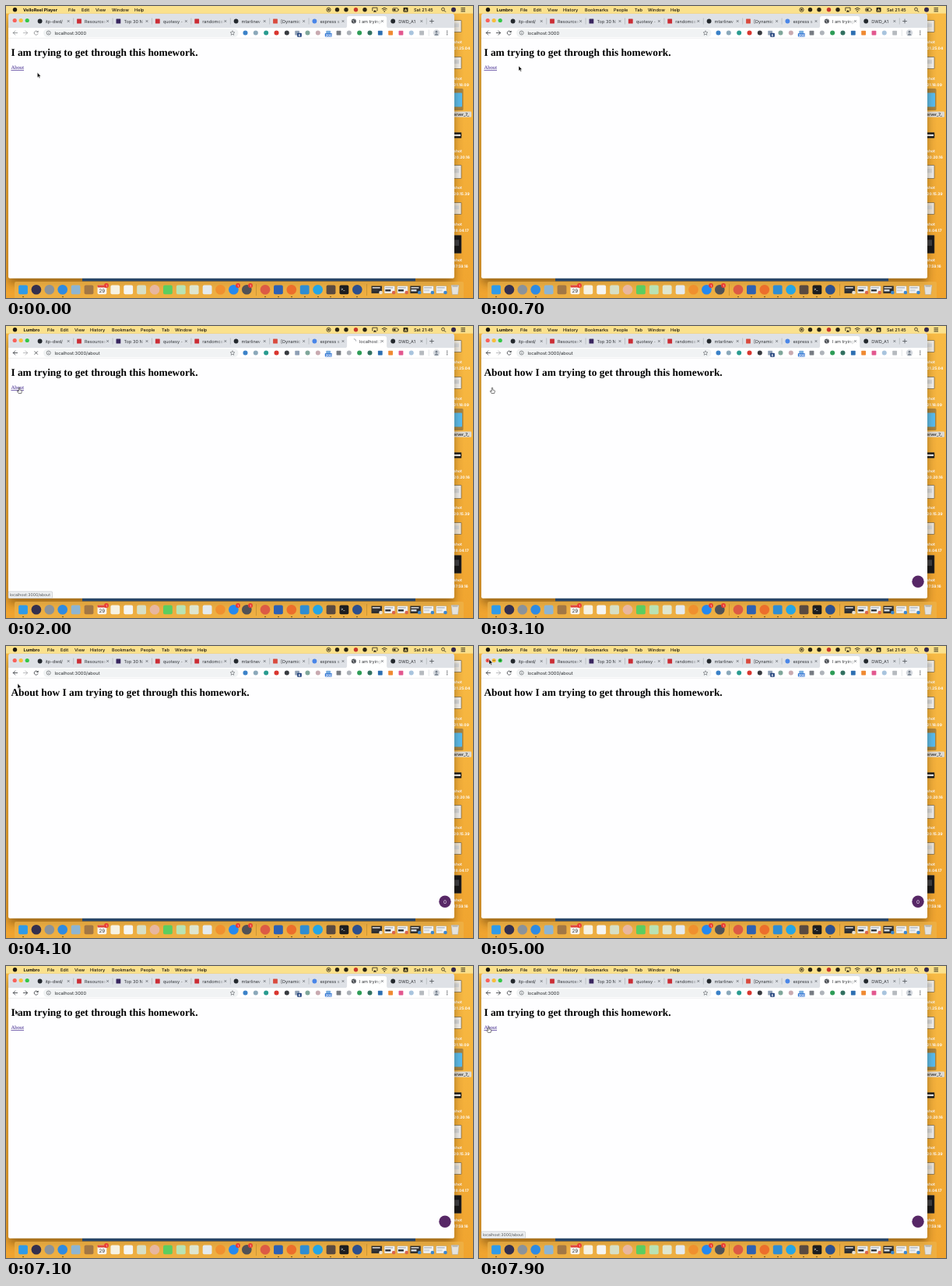
These frames come from a looping animation (600 by 375 pixels, 8000 ms). An HTML page:

```html
<!DOCTYPE html>
<html lang="en">
<head>
<meta charset="utf-8">
<title>Homework walkthrough</title>
<style>
  html, body { margin: 0; width: 100%; height: 100%; overflow: hidden; background: #f3ac37; }
  #stage { display: block; width: 600px; height: 375px; }
  text { font-family: Inter, "Open Sans", sans-serif; text-rendering: geometricPrecision; white-space: pre; }
  .page text { font-family: "Liberation Serif", "Times New Roman", serif; }
</style>
</head>
<body>
<svg id="stage" viewBox="0 0 600 375" xmlns="http://www.w3.org/2000/svg"></svg>
<script>
const LOOP = 8000, STEP = 100;

// --- drawing helpers ---
const rect = (x, y, w, h, fill, r = 0, extra = '') =>
  `<rect x="${x}" y="${y}" width="${w}" height="${h}" rx="${r}" fill="${fill}" ${extra}/>`;
const disc = (x, y, r, fill, extra = '') =>
  `<circle cx="${x}" cy="${y}" r="${r}" fill="${fill}" ${extra}/>`;
const line = (d, stroke = '#5f6368', w = .8, extra = '') =>
  `<path d="${d}" fill="none" stroke="${stroke}" stroke-width="${w}" ${extra}/>`;
const text = (x, y, size, str, fill = '#202124', extra = '') =>
  `<text x="${x}" y="${y}" font-size="${size}" fill="${fill}" ${extra}>${str}</text>`;
const group = (id, body, extra = '') => `<g id="${id}" ${extra}>${body}</g>`;
const cross = (x, y, r, c, w) =>
  line(`M${x - r} ${y - r}L${x + r} ${y + r}M${x + r} ${y - r}L${x - r} ${y + r}`, c, w);
const BOLD = 'font-weight="700"';

const defs = `<defs>
  <linearGradient id="wall" x2="0" y2="1"><stop stop-color="#f8bb45"/><stop offset="1" stop-color="#f0a42f"/></linearGradient>
  <linearGradient id="fade"><stop stop-color="#dee1e6" stop-opacity="0"/><stop offset="1" stop-color="#dee1e6"/></linearGradient>
  <linearGradient id="fadeOn"><stop stop-color="#fff" stop-opacity="0"/><stop offset="1" stop-color="#fff"/></linearGradient>
  <filter id="soft" x="-10%" y="-10%" width="120%" height="120%"><feGaussianBlur stdDeviation="6"/></filter>
</defs>`;

// --- desktop files on the right ---
function desktop() {
  const shots = [
    [26, 15, '#f3efe6', '21.25.04'], [73, 15, '#f6f5f2', '21.18.09'], [166, 7, '#111', '20.20.16'],
    [213, 17, '#f1f1f0', '20.15.39'], [260, 15, '#f0e9dc', '18.04.17'], [306, 23, '#15161a', '17.59.16'],
  ];
  let out = '';
  for (const [y, h, fill, time] of shots) {
    out += rect(570, y - h / 2, 15, h, fill, .4, 'stroke="#55503f" stroke-width=".6"');
    if (fill !== '#111') out += rect(570, y - h / 4, 12, h / 3, fill === '#15161a' ? '#3a3d44' : '#d9dde2');
    else out += rect(570, y - 1.2, 14, 2.4, '#f4f4f4');
    out += text(575.3, y + 22.3, 4.9, 'shot', '#fff', BOLD) + text(575.3, y + 29.6, 4.9, time, '#fff', BOLD);
  }
  out += rect(566, 106, 21.5, 28, '#a9843f', 1.5) + rect(566, 111.5, 20, 18, '#58bdf0', 1);
  return out + rect(566, 135.5, 32, 7.3, '#dcd9d2', 1) + text(575.3, 140.9, 4.9, 'erver_7_', '#333', BOLD);
}

// --- menu bar ---
function menu(id, items) {
  return group(id, items.map(([x, s], i) => text(x, 7, 5.6, s, '#171309', i ? 'font-weight="500"' : BOLD)).join(''));
}
function menuBar() {
  const ink = '#2b2413';
  let out = rect(0, 0, 600, 9.6, '#fae18d') + disc(11.5, 4.8, 2.7, '#1c1810');
  out += menu('menuA', [[22, 'VelloReel Player'], [80, 'File'], [97, 'Edit'], [115, 'View'], [136, 'Window'], [165, 'Help']]);
  out += menu('menuB', [[22.5, 'Lumbro'], [53, 'File'], [70, 'Edit'], [88, 'View'], [108, 'History'],
    [136, 'Bookmarks'], [173, 'People'], [200, 'Tab'], [217, 'Window'], [246, 'Help']]);
  out += disc(414.5, 4.8, 2.6, 'none', `stroke="${ink}" stroke-width=".8"`) + disc(414.5, 4.8, 1.2, ink);
  out += disc(425.5, 4.8, 2.7, ink) + disc(437, 4.8, 2.7, ink);
  out += disc(449.5, 4.8, 2.7, '#c5372c') + disc(461, 4.8, 2.7, ink);
  out += line('M471.500 6H470.800V2.200H477V6H476.200', ink, .8) + `<path d="M471.800 7.800L473.900 5L476 7.800Z" fill="${ink}"/>`;
  out += line('M482.800 3.800q3.400-3 6.800 0M484 5.400q2.200-2 4.400 0', ink, .9) + disc(486.2, 7, .8, ink);
  out += rect(496.6, 2.8, 7, 4, 'none', 1, `stroke="${ink}" stroke-width=".7"`) + rect(497.5, 3.7, 3, 2.2, ink) + rect(504.2, 4, .7, 1.6, ink);
  out += rect(510.5, 2, 6, 5.8, ink, 1) + text(511.8, 6.7, 4.8, 'A', '#fae18d', BOLD);
  out += text(524, 7, 5.6, 'Sat 21:45', '#171309', 'font-weight="500"');
  out += disc(561.5, 4.2, 1.9, 'none', `stroke="${ink}" stroke-width=".8"`) + line('M563 5.700l2 2', ink, .9);
  out += disc(575, 4.8, 3, '#33284d');
  return out + line('M584.500 2.700h5.500M584.500 4.800h5.500M584.500 6.900h5.500', ink, .9);
}

// --- browser window ---
function tabStrip() {
  const tabs = [
    ['c', '#24292e', 'itp-dwd/'], ['s', '#cb2d35', 'Resources'], ['s', '#39265f', 'Top 30 N'], ['s', '#cb2d35', 'quotesy -'],
    ['s', '#cb2d35', 'randomco'], ['c', '#24292e', 'mtarlinev'], ['s', '#d94a3d', '[Dynamic'], ['c', '#4a86e8', 'express s'],
    ['', '', ''], ['c', '#24292e', 'DWD_A1'],
  ];
  const light = (x, c) => disc(x, 18.5, 2.6, c);
  let out = `<path d="M3 28V13q0-3.400 3.400-3.400H572.600q3.400 0 3.400 3.400V28Z" fill="#dee1e6"/>`;
  out += light(11.2, '#f9605a') + light(19.2, '#f8be3c') + light(27.2, '#34c748');
  out += group('hover', cross(11.2, 18.5, 1.1, '#7a1410', .6) + line('M17.600 18.500h3.200', '#8a5a0a', .7) +
    line('M25.800 18.500h2.800M27.200 17.100v2.800', '#0f6318', .7));
  out += `<path d="M435.500 28q2.600 0 2.600-2.600V15.500q0-2.600 2.600-2.600H486.500q2.600 0 2.600 2.600v9.900q0 2.600 2.600 2.600Z" fill="#fff"/>`;
  tabs.forEach(([shape, color, name], i) => {
    const x = 43.6 + i * 50.4, on = i === 8;
    if (shape === 'c') out += disc(x, 19.5, 2.9, color);
    if (shape === 's') out += rect(x - 2.9, 16.6, 5.8, 5.8, color, .5);
    const label = on ? text(0, 7, 5.6, 'I am trying', '#303337', 'id="tabName"') : text(0, 7, 5.6, name, '#303337');
    out += `<svg x="${x + 7}" y="14.8" width="28" height="10">${label}${rect(21, 0, 7, 10, on ? 'url(#fadeOn)' : 'url(#fade)')}</svg>`;
    out += cross(x + 36.6, 19.5, 1.3, '#4d5156', .7);
    if (i < 7 || i > 8) out += line(`M${x + 43.1} 15.500v8`, '#9a9ea4', .5);
  });
  out += group('globe', disc(446.8, 19.5, 3, '#4a4e53') + line('M444.600 18.200l2 .6-.4 1.600 1.800 1.200M447.300 17l1.300 1.300', '#c9ccd0', .7));
  out += group('spinner', line('M0-2.900A2.900 2.900 0 0 1 2.900 0', '#8a8f96', .8));
  return out + line('M547 16.700v5.600M544.200 19.500h5.600', '#4d5156', .8);
}

function extensions() {
  const icons = [
    ['c', '#3b82c8'], ['c', '#8ca9ba'], ['c', '#2a9c90'], ['c', '#d9362f'], ['c', '#383b40'], ['s', '#8e9fb5'],
    ['c', '#7fa69a'], ['c', '#c8aab0'], ['s', '#78aee0'], ['s', '#777c82'], ['c', '#aeb3b9'], ['c', '#2e9d57'],
    ['c', '#327160'], ['s', '#2d6fb2'], ['s', '#ef8a32'], ['s', '#e2588f'], ['c', '#a8c4de'], ['s', '#b6babf'],
  ];
  let out = icons.map(([shape, c], i) => {
    const x = 307.5 + i * 13.33;
    return shape === 'c' ? disc(x, 34.6, 3, c) : rect(x - 2.9, 31.7, 5.8, 5.8, c, .7);
  }).join('');
  out += group('tally', rect(374.2, 34.7, 5.6, 5, '#1f3f7a', .8) + text(375.6, 38.7, 4.3, '6', '#fff', BOLD));
  return out + rect(409.8, 35, 9, 4.6, '#3a7bd5', .8) + text(410.7, 38.7, 4, '200', '#fff', BOLD);
}

function toolbar() {
  const round = 'stroke-linecap="round" stroke-linejoin="round"';
  let out = rect(3, 28, 573, 13.2, '#fff') + line('M3 41.300H576', '#dcdee1', .5);
  out += disc(12, 34.5, 5.4, '#e6e8eb', 'id="backHover"');
  out += line('M14.600 34.500H9.400M11.800 31.900L9.200 34.500L11.800 37.100', '#3f4347', .85, `id="back" ${round}`);
  out += line('M22.300 34.500h5.200M25 31.900l2.600 2.600L25 37.100', '#3f4347', .85, `id="next" ${round}`);
  out += group('reload', line('M40.800 33.200A2.500 2.500 0 1 0 41.100 35.300', '#3f4347', .85) +
    '<path d="M41.600 31.400v2.700h-2.700Z" fill="#3f4347"/>');
  out += group('stop', cross(38.7, 34.5, 2.1, '#3f4347', .85));
  out += rect(48, 29.2, 250.5, 10.8, '#f1f3f4', 5.4);
  out += disc(54.7, 34.5, 2.5, 'none', 'stroke="#5f6368" stroke-width=".7"') + line('M54.700 34.200v1.700M54.700 32.700v.7', '#5f6368', .7);
  out += text(62.4, 36.6, 5.75, '', '#26292c', 'id="url"');
  out += line('M291 31.700l.8 1.900 2.100.2-1.600 1.400.5 2.100-1.800-1.100-1.800 1.100.5-2.100-1.600-1.400 2.100-.2Z', '#5f6368', .6);
  out += extensions() + line('M543.300 30.500v8', '#cfd2d6', .6);
  out += disc(553, 34.5, 4.2, '#d5d9df') + disc(553, 33.2, 1.4, '#75808d') + `<path d="M550.300 37.400q2.700-4.200 5.400 0Z" fill="#75808d"/>`;
  return out + [32.3, 34.5, 36.7].map(y => disc(566.8, y, .7, '#4d5156')).join('');
}

function browser() {
  let out = rect(98, 345, 428, 8.4, '#1d5ca8');
  out += rect(3, 16, 573, 341, '#3a2200', 3, 'opacity=".45" filter="url(#soft)"');
  out += rect(3, 30, 573, 319.7, '#fefeff', 2) + tabStrip() + toolbar();
  const title = text(6.4, 63.5, 13.36, '', '#000', `id="title" ${BOLD}`);
  const link = text(6.4, 81.4, 6.67, 'About', '#351a86', 'id="link" text-decoration="underline"');
  out += group('', title + link, 'class="page"');
  out += group('badge', disc(564, 328.3, 7.7, '#572766') + text(564, 330.7, 6.4, '0', '#e9dcee', 'id="count" text-anchor="middle"'));
  return out + group('status', rect(3, 341, 56.5, 8.6, '#eef0f2', 1, 'stroke="#aeb2b8" stroke-width=".5"') +
    text(4.8, 347.1, 5.15, 'localhost:3000/about', '#4d5156'));
}

// --- dock ---
function dock() {
  const left = 's#2f9be9 c#34304f c#8b939b c#2e8be2 s#8db5d4 s#a27745 s#f7f6f3 s#f6f2e2 s#f5f5f3 s#d7dfc5 c#e8b79f s#5ccd60 s#b9e3b4 s#dfe6cf s#e3eaef c#f0902f c#2589ef c#505257';
  const right = 'c#dc5a45 s#2d61b3 c#ec6e2c s#2e8dd3 c#25a5e5 s#5a4a40 s#1c1d1f c#2c4f8d';
  const icon = (spec, x) => {
    const c = spec.slice(1);
    return spec[0] === 'c' ? disc(x, 364.3, 6.3, c) : rect(x - 5.9, 358.4, 11.8, 11.8, c, 2);
  };
  const row = (list, x0) => list.split(' ').map((s, i) => icon(s, x0 + i * 16.9)).join('');
  let out = rect(11, 354, 577, 24, '#eeb44a', 2, 'opacity=".7"');
  out += row(left, 22) + row(right, 333);
  out += rect(117.5, 358.4, 11.8, 3, '#e0463c', 1) + text(123.4, 368.2, 6.2, '29', '#333', 'text-anchor="middle"');
  out += text(430.2, 364.8, 4.5, '&gt;_', '#eee', BOLD);
  for (const x of [129, 298, 314]) out += disc(x, 359, 2.9, '#ea3a33') + text(x, 360.6, 4.2, '1', '#fff', 'text-anchor="middle"');
  for (const x of [321.5, 463.5]) out += line(`M${x} 357v15`, '#a77a28', .5);
  for (let i = 0; i < 6; i++) {
    const x = 469.5 + i * 16.6, dark = i % 3 === 0;
    out += rect(x, 359.5, 13.5, 9.5, dark ? '#2b2c2f' : '#f2f3f4', .4, 'stroke="#8e7442" stroke-width=".3"');
    out += rect(x + 1.2, 361, 10, 1.6, dark ? '#d6d6d6' : '#b6bdc6') + rect(x + 1.2, 364, 7, 2.5, i < 3 ? '#33363b' : '#d3d8de');
    out += disc(x + 12, 368, 2.3, i === 0 ? '#e8e0d0' : i < 3 ? '#db6549' : '#3c87cf');
  }
  out += '<path d="M572 358.500h10l-1.300 12h-7.400Z" fill="#e4e3df" stroke="#a8a69d" stroke-width=".5"/>' + rect(573.3, 358.8, 7.4, 2, '#b9b8b2', 1);
  return out + [22, 73, 333, 350, 367, 384, 401, 417, 434, 451].map(x => disc(x, 373.4, .7, '#2f2410')).join('');
}

function pointers() {
  const arrow = '<path d="M0 0V6.300L1.500 5L2.500 7.200L3.500 6.700L2.500 4.600H4.500Z" fill="#000" stroke="#fff" stroke-width=".45"/>';
  const hand = '<path d="M-.7.3a.7.7 0 0 1 1.400 0V2.600l2 .5q.9.300.7 1.200L2.700 7H-.9L-2.600 4.500q-.2-1.100.7-.8l1.200.9Z" fill="#fff" stroke="#111" stroke-width=".55"/>';
  return group('arrow', arrow) + group('hand', hand);
}

const stage = document.getElementById('stage');
const wall = rect(0, 0, 600, 375, 'url(#wall)');
stage.innerHTML = defs + wall + desktop() + browser() + dock() + menuBar() + pointers();
const el = {};
stage.querySelectorAll('[id]').forEach(n => el[n.id] = n);

// --- timing ---
// pointer stops: time, x, y
const path = [
  [0, 40.3, 85.6], [200, 40.3, 85.6], [700, 51, 77], [1000, 51, 77], [1600, 17, 79.5], [3600, 17, 79.5],
  [4600, 13, 17.2], [5100, 13, 17.2], [5800, 11.6, 34], [6700, 11.6, 34], [7500, 12.4, 78.4], [LOOP, 12.4, 78.4],
];
const ease = p => p * p * (3 - 2 * p);
function pointerAt(t) {
  const i = path.findIndex((p, k) => k && t <= p[0]);
  const [t0, x0, y0] = path[i - 1], [t1, x1, y1] = path[i];
  const p = ease((t - t0) / (t1 - t0));
  return [x0 + (x1 - x0) * p, y0 + (y1 - y0) * p];
}

const within = (t, a, b) => t >= a && t < b;
const show = (node, on) => node.setAttribute('display', on ? 'inline' : 'none');
const put = (node, str) => { if (node.textContent !== str) node.textContent = str; };

function draw(t) {
  const active = t >= 400;
  const about = within(t, 2500, 6400);
  const loading = within(t, 1900, 2500);
  const [x, y] = pointerAt(t);
  const overLink = !about && x < 23 && within(y, 75, 82.5);
  const hand = overLink || within(t, 2500, 3700);

  show(el.menuA, !active);
  show(el.menuB, active);
  put(el.title, about ? 'About how I am trying to get through this homework.' : 'I am trying to get through this homework.');
  show(el.link, !about);
  put(el.url, about || loading ? 'localhost:3000/about' : 'localhost:3000');
  put(el.tabName, loading ? 'localhost:3' : 'I am trying');

  show(el.globe, !loading);
  show(el.spinner, loading);
  el.spinner.setAttribute('transform', `translate(446.8 19.5) rotate(${(t - 2000) * .36})`);
  show(el.reload, !loading);
  show(el.stop, loading);
  show(el.tally, !loading);
  el.back.setAttribute('opacity', active ? 1 : .6);
  el.reload.setAttribute('opacity', active ? 1 : .6);
  el.next.setAttribute('opacity', active && !about && !loading ? 1 : .4);

  show(el.hover, within(x, 8, 31) && within(y, 14, 23));
  show(el.backHover, within(x, 6, 18) && within(y, 29, 40));
  show(el.status, overLink);
  show(el.badge, within(t, 2900, 6400) || t >= 7000);
  show(el.count, within(t, 3900, 6400));

  show(el.hand, hand);
  show(el.arrow, !hand);
  (hand ? el.hand : el.arrow).setAttribute('transform', `translate(${x.toFixed(2)} ${y.toFixed(2)})`);
}

const start = performance.now();
function tick() {
  const t = (performance.now() - start) % LOOP;
  draw(Math.floor(t / STEP) * STEP);
  requestAnimationFrame(tick);
}
tick();
</script>
</body>
</html>
```
